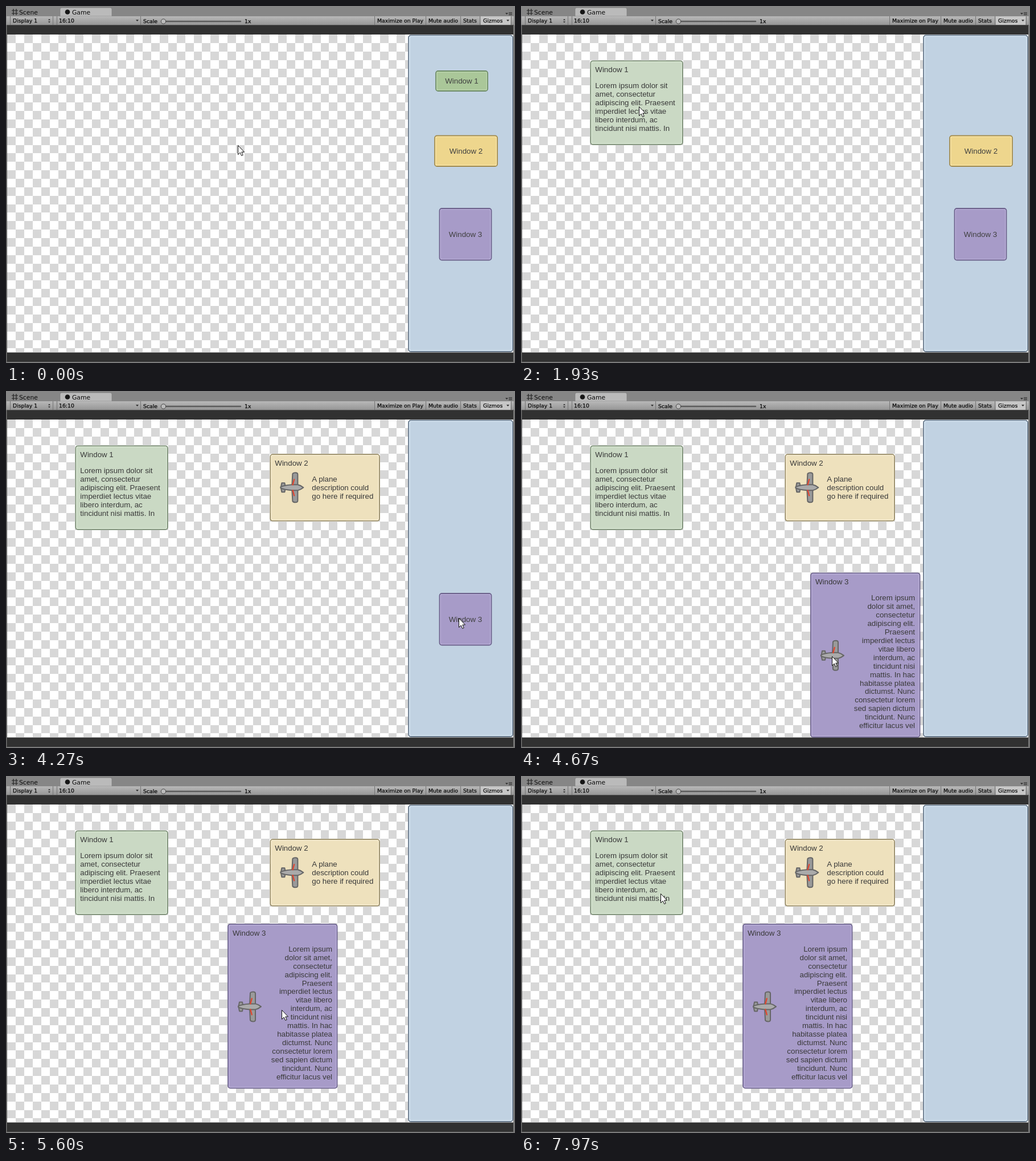
Recreate the animation shown at these times as an HTML page. Size 894 px wide and 626 px high, loop 8000 ms.

```html
<!DOCTYPE html>
<html lang="en">
<head>
<meta charset="utf-8">
<title>Window docking</title>
<style>
  html, body { margin: 0; width: 100%; height: 100%; overflow: hidden; background: #868686; }
  svg { display: block; }
  text { white-space: pre; }
  .ui { font: 9.3px "DejaVu Sans", sans-serif; fill: #0a0a0a; stroke: #0a0a0a; stroke-width: .25px; }
  .tab { font: 10.8px "DejaVu Sans", sans-serif; fill: #0a0a0a; }
  .body { font: 13.3px "Liberation Sans", Arial, sans-serif; fill: #393939; }
  .label { font: 13.3px "Liberation Sans", Arial, sans-serif; fill: #404040; text-anchor: middle; }
</style>
</head>
<body>
<svg id="stage" width="894" height="626" viewBox="0 0 894 626" xmlns="http://www.w3.org/2000/svg">
  <defs>
    <linearGradient id="bar" x2="0" y2="1">
      <stop offset="0" stop-color="#b8b8b8"/><stop offset="1" stop-color="#949494"/>
    </linearGradient>
    <g id="plane" stroke="#666" stroke-width="2" stroke-linejoin="round" fill="#9a9a9a">
      <path d="M1-24Q2-26 6-26Q10-26 10-23V-4H0ZM1 24Q2 26 6 26Q10 26 10 23V4H0Z"/>
      <path d="M-18-8H-13L-12-3V3L-13 8H-18L-19 3V-3Z"/>
      <path d="M-20-1Q-14-4 0-5H10Q15-4 20 0Q15 4 10 5H0Q-14 4-20 1Z" fill="#aaa"/>
      <path d="M4-15L1-4M1 4L4 15" fill="none" stroke="#e2452f" stroke-width="2.2"/>
    </g>
  </defs>

  <rect width="894" height="626" fill="#868686"/>
  <path d="M95 18V6Q95 3 98 3H183Q186 3 186 6V18Z" fill="#bababa" stroke="#777" stroke-width=".6"/>
  <path d="M13 5V16M18 5V16M10 8H21M10 13H21" stroke="#222" stroke-width="1.2"/>
  <circle cx="108" cy="10.500" r="4.300" fill="#161616"/>
  <text class="tab" x="23" y="15">Scene</text>
  <text class="tab" x="116" y="15">Game</text>
  <path d="M877 12H882L879.500 15ZM883 11H889V12H883ZM883 13H889V14H883ZM883 15H889V16H883Z" fill="#333"/>

  <rect x="1" y="18" width="891" height="16" fill="url(#bar)"/>
  <rect x="834" y="18" width="52" height="15" fill="#c6c6c6"/>
  <path d="M7.500 18V33M82.500 18V33M89.500 18V33M236.500 18V33M647.500 18V33M737.500 18V33M798.500 18V33M832.500 18V33M887.500 18V33" stroke="#747474"/>
  <path d="M1 33.500H892" stroke="#555"/>
  <path d="M74 25H78L76 22.500ZM74 27H78L76 29.500ZM228 24H233L230.500 27ZM879 24H884L881.500 27Z" fill="#333"/>
  <path d="M277 27H412" stroke="#5c5c5c" stroke-width="2.400" stroke-linecap="round"/>
  <circle cx="276.500" cy="27" r="4.200" fill="#bcbcbc" stroke="#444"/>
  <g class="ui">
    <text x="12" y="29">Display 1</text>
    <text x="93" y="29">16:10</text>
    <text x="241" y="30">Scale</text>
    <text x="419" y="30">1x</text>
    <text x="652" y="29">Maximize on Play</text>
    <text x="742" y="29">Mute audio</text>
    <text x="803" y="29">Stats</text>
    <text x="838" y="29">Gizmos</text>
  </g>

  <rect y="34" width="894" height="592" fill="#7c7c7c"/>
  <rect x="1" y="34" width="890" height="590" fill="#313131"/>
  <rect x="2" y="50" width="889" height="557.500" fill="#fff"/>
  <path id="checks" fill="#d7d7d7"/>
  <path d="M.500 34V626M893 34V626" stroke="#6f6f6f" stroke-width="2"/>
  <rect x="707" y="51.500" width="183" height="554.500" rx="4" fill="#c1d2e2" stroke="#667789" stroke-width="1.800"/>
  <rect x="708.700" y="53.200" width="179.600" height="551" rx="3" fill="none" stroke="#d9e9f6" stroke-width="1.500"/>
  <g id="items"></g>
  <path id="cursor" d="M.500.500V16.500L4.200 13L6.700 18.500L9.200 17.400L6.800 12H11.500Z" fill="#fff" stroke="#111"/>
</svg>
<script>
const LOOP = 8000, STEP = 1000 / 30, CELL = 14.87, LEFT = 2.4, TOP = 50.7, EDGE = 706, FLOOR = 607;
const $ = id => document.getElementById(id);

let checks = "";
for (let row = 0; row < 38; row++) {
  for (let col = row % 2; col < 48; col += 2) {
    const x = Math.round(LEFT + col * CELL), y = Math.round(TOP + row * CELL - .5);
    const r = Math.min(EDGE, Math.round(LEFT + (col + 1) * CELL));
    const b = Math.min(FLOOR, Math.round(TOP + (row + 1) * CELL - .5));
    checks += `M${x} ${y}H${r}V${b}H${x}Z`;
  }
}
$("checks").setAttribute("d", checks);

const box = (w, h, fill, line, light) =>
  `<rect x="1" y="1" width="${w - 2}" height="${h - 2}" rx="4" fill="${fill}" stroke="${line}" stroke-width="1.800"/>
   <rect x="2.600" y="2.600" width="${w - 5.2}" height="${h - 5.2}" rx="2.500" fill="none" stroke="${light}" stroke-width="1.400"/>`;
const lines = (text, x, anchor) => text.split("|").map((line, i) =>
  `<text class="body" x="${x}" y="${49 + i * 14.92}" text-anchor="${anchor}">${line}</text>`).join("");
const plane = (x, y) => `<use href="#plane" x="${x}" y="${y}"/>`;

// drags: [grab, release, rejected]
const items = [
  {
    name: "Window 1", w: 163.5, h: 148.5, button: [754, 113, 93, 37],
    tint: ["#aac799", "#6d8b65", "#bcd6ae"], win: ["#cad9c4", "#778a71", "#d9e7d4"],
    body: lines("Lorem ipsum dolor sit|amet, consectetur|adipiscing elit. Praesent|imperdiet lectus vitae|libero interdum, ac|tincidunt nisi mattis. In", 9, "start"),
    drags: [[980, 1960]]
  },
  {
    name: "Window 2", w: 193.5, h: 118.5, button: [752, 226.5, 112, 55.5],
    tint: ["#eed68d", "#a18a4c", "#f9e6aa"], win: ["#eee1bd", "#978a64", "#f8eed3"],
    body: plane(39, 59) + lines("A plane|description could|go here if required", 74, "start"),
    drags: [[2550, 3270]]
  },
  {
    name: "Window 3", w: 193.5, h: 289.5, button: [760.5, 354, 93, 92.5],
    tint: ["#a79bc8", "#6a608a", "#b9aed8"], win: ["#a79bc8", "#6a608a", "#b9aed8"],
    body: plane(39, 145.5) + lines("Lorem ipsum|dolor sit amet,|consectetur|adipiscing elit.|Praesent|imperdiet lectus|vitae libero|interdum, ac|tincidunt nisi|mattis. In hac|habitasse platea|dictumst. Nunc|consectetur lorem|sed sapien dictum|tincidunt. Nunc|efficitur lacus vel", 184, "end"),
    drags: [[4410, 5640], [6215, 7255, true]]
  }
];

for (const item of items) {
  const [, , bw, bh] = item.button;
  const add = html => {
    const g = document.createElementNS("http://www.w3.org/2000/svg", "g");
    g.innerHTML = html;
    $("items").append(g);
    return g;
  };
  item.small = add(box(bw, bh, ...item.tint) +
    `<text class="label" x="${bw / 2}" y="${bh / 2 + 4.5}">${item.name}</text>`);
  item.big = add(box(item.w, item.h, ...item.win) +
    `<text class="body" x="9" y="21">${item.name}</text>` + item.body);
}

// pointer path: time, x, y
const path = [
  [0, 407, 244], [237, 407, 244], [400, 875, 197],
  [500, 875, 125], [610, 875, 125], [830, 822, 125], [967, 822, 125],
  [1130, 690, 127], [1450, 390, 190], [1630, 255, 214], [1800, 222, 202], [1900, 207, 176],
  [2097, 207, 176], [2430, 859, 247], [2540, 859, 247],
  [2700, 700, 262], [2900, 620, 235], [3200, 566, 178],
  [3400, 566, 178], [3770, 800, 410], [4040, 800, 410], [4260, 795, 398], [4400, 795, 398],
  [4560, 700, 460], [4750, 420, 462], [4900, 265, 440], [5000, 312, 434], [5230, 368, 424], [5567, 484, 410],
  [6200, 484, 410], [6500, 420, 330], [6797, 341, 276], [6833, 339, 274], [7000, 311, 249],
  [7840, 311, 249], [7965, 245, 206], [8000, 245, 206]
];

// slope at a key, flat where the direction turns or rests
function slope(i, axis) {
  const a = path[i - 1], b = path[i], c = path[i + 1];
  if (!a || !c || (b[axis] - a[axis]) * (c[axis] - b[axis]) <= 0) return 0;
  return (c[axis] - a[axis]) / (c[0] - a[0]);
}

function pointer(t) {
  let i = 0;
  while (i < path.length - 2 && path[i + 1][0] <= t) i++;
  const a = path[i], b = path[i + 1], d = b[0] - a[0], s = Math.min(1, (t - a[0]) / d);
  const ease = s * s * (3 - 2 * s);
  return [1, 2].map(k => a[k] + (b[k] - a[k]) * ease
    + d * s * (1 - s) * ((1 - s) * slope(i, k) - s * slope(i + 1, k)));
}

const clamp = (v, max) => Math.max(0, Math.min(max, v));

function snap(item, [x, y]) {
  const col = clamp(Math.round((x - item.w / 2 - LEFT) / CELL), Math.floor((EDGE - LEFT - item.w) / CELL));
  const row = clamp(Math.round((y - 3 - item.h / 2 - TOP) / CELL), Math.floor((FLOOR + 1.5 - TOP - item.h) / CELL));
  return [LEFT + col * CELL, TOP + row * CELL];
}

function place(item, t) {
  const [bx, by] = item.button;
  let state = { x: bx, y: by, open: false };
  for (const [grab, release, rejected] of item.drags) {
    if (t < grab || (rejected && t >= release)) continue;
    const p = pointer(Math.min(t, release) - STEP);
    if (!state.open && p[0] >= EDGE) {
      const start = pointer(grab - STEP);
      return { x: bx + p[0] - start[0], y: by + p[1] - start[1], open: false };
    }
    const [x, y] = snap(item, p);
    state = { x, y, open: true };
  }
  return state;
}

const overlaps = (a, p, b, q) =>
  p.x < q.x + b.w - 2 && q.x < p.x + a.w - 2 && p.y < q.y + b.h - 2 && q.y < p.y + a.h - 2;

const move = (node, x, y) => node.setAttribute("transform", `translate(${x.toFixed(2)} ${y.toFixed(2)})`);

function draw(time) {
  const t = Math.floor((time % LOOP + 5) / STEP) * STEP;
  const spots = items.map(item => place(item, t));
  items.forEach((item, i) => {
    const spot = spots[i];
    const held = item.drags.some(([grab, release]) => t >= grab && t < release);
    const blocked = held && spot.open && items.some((other, j) =>
      j !== i && spots[j].open && overlaps(item, spot, other, spots[j]));
    item.small.style.display = spot.open ? "none" : "";
    item.big.style.display = spot.open ? "" : "none";
    item.big.setAttribute("opacity", blocked ? .5 : 1);
    move(spot.open ? item.big : item.small, spot.x, spot.y);
  });
  $("cursor").style.display = t > 415 && t < 620 ? "none" : "";
  move($("cursor"), ...pointer(t).map(Math.round));
}

const began = performance.now();
function tick() {
  draw(performance.now() - began);
  requestAnimationFrame(tick);
}
tick();
</script>
</body>
</html>
```
